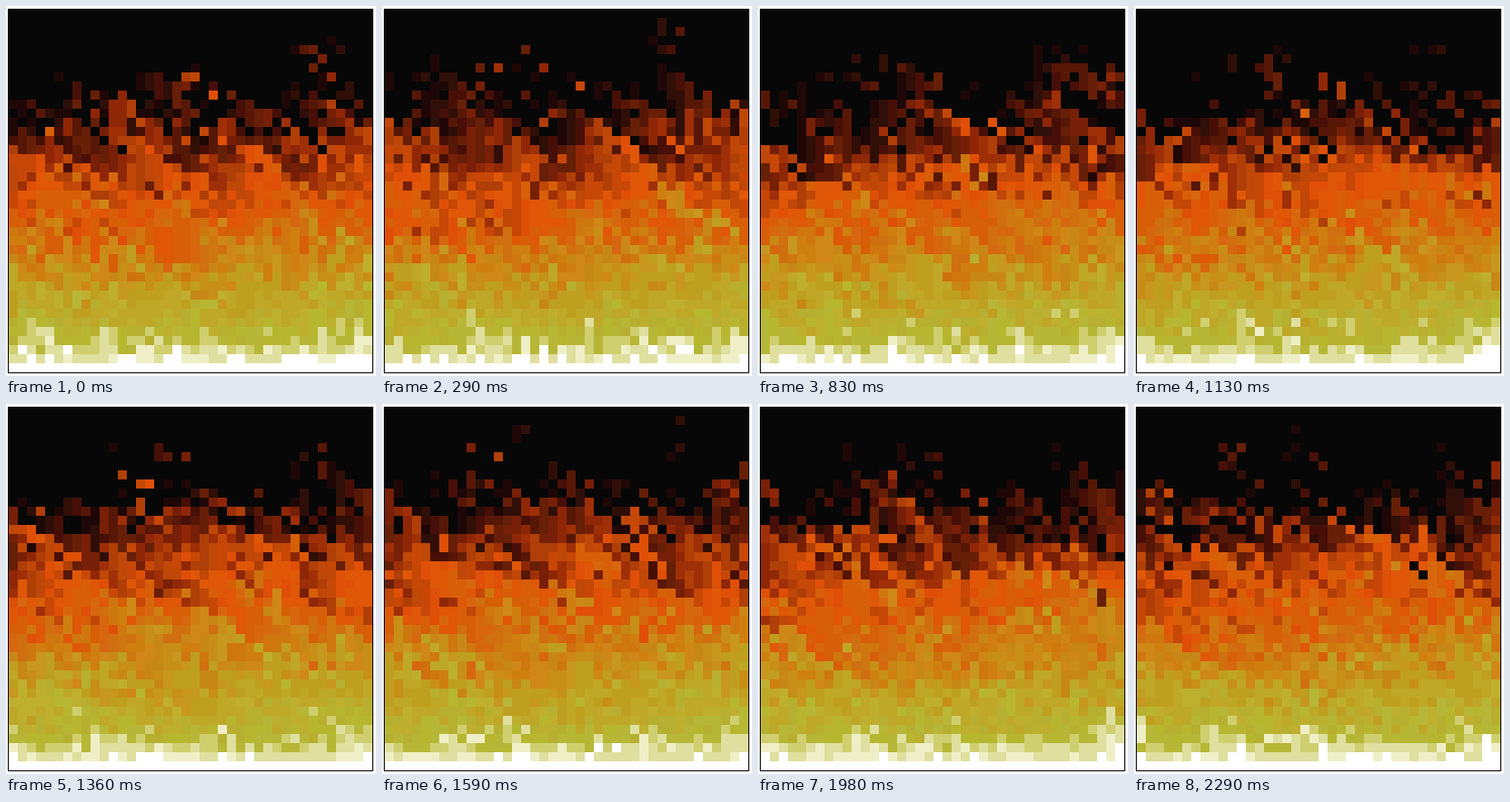
These frames come from a looping animation (407x407 px, 2.36 s). An HTML page with a canvas:

```html
<!DOCTYPE html>
<html lang="en">
<head>
<meta charset="utf-8">
<title>Pixel fire</title>
<style>
html, body { margin: 0; width: 100%; height: 100%; overflow: hidden; background: #fff; }
canvas { display: block; width: 407px; height: 407px; image-rendering: pixelated; }
</style>
</head>
<body>
<canvas id="stage" width="407" height="407"></canvas>
<script>
const SIZE = 40, CELL = 10, EDGE = 3, TICK = 50, LOOP = 2360;
const HOTTEST = 36;

// black, red, orange, yellow, white
const PALETTE = (
  '070707 1f0707 2f0f07 470f07 571707 671f07 771f07 8f2707 9f2f07 af3f07 ' +
  'bf4707 c74707 df4f07 df5707 df5707 d75f07 d75f07 d7670f cf6f0f cf770f ' +
  'cf7f0f cf8717 c78717 c78f17 c7971f bf9f1f bf9f1f bfa727 bfa727 bfaf2f ' +
  'b7af2f b7b72f b7b737 cfcf6f dfdf9f efefc7 ffffff'
).split(' ').map(hex => '#' + hex);

// length of each picture in units of 10 ms
const HOLDS = [...'7878787887878878788788788888788'].map(Number);

const starts = [];
HOLDS.reduce((time, hold) => {
  starts.push(time);
  return time + hold * 10;
}, 0);

// small fast counting generator: well mixed over long strides
function seeded(seed) {
  let a = 0, b = 0, c = seed, count = 1;
  const next = () => {
    const sum = (a + b + count++) | 0;
    a = b ^ (b >>> 9);
    b = (c + (c << 3)) | 0;
    c = (((c << 21) | (c >>> 11)) + sum) | 0;
    return (sum >>> 0) / 4294967296;
  };
  for (let i = 0; i < 20; i++) next();
  return next;
}

const random = seeded(1993);
const fire = new Uint8Array(SIZE * SIZE);
fire.fill(HOTTEST, SIZE * (SIZE - 1));

// heat rises one row, cools a little and drifts left
function spread() {
  for (let x = 0; x < SIZE; x++) {
    for (let y = 0; y < SIZE - 1; y++) {
      const i = y * SIZE + x;
      const decay = Math.floor(random() * 3);
      if (i >= decay) fire[i - decay] = Math.max(0, fire[i + SIZE] - decay);
    }
  }
}

for (let i = 0; i < 120; i++) spread();

let ticks = 0;
const pictures = starts.map(start => {
  for (; ticks < Math.floor(start / TICK); ticks++) spread();
  return fire.slice();
});

const ctx = document.getElementById('stage').getContext('2d');
let shown = -1;

function box(color, x, y, w, h) {
  ctx.fillStyle = color;
  ctx.fillRect(x, y, w, h);
}

function draw(index) {
  const side = SIZE * CELL;
  box('#fff', 0, 0, 407, 407);
  pictures[index].forEach((heat, i) => {
    box(PALETTE[heat], EDGE + (i % SIZE) * CELL, EDGE + Math.floor(i / SIZE) * CELL, CELL, CELL);
  });
  // frame: the top line lies over the first row of cells
  box('#000', EDGE - 1, EDGE, side + 2, 1);
  box('#000', EDGE - 1, EDGE + side, side + 2, 1);
  box('#000', EDGE - 1, EDGE, 1, side);
  box('#000', EDGE + side, EDGE, 1, side);
}

function update() {
  const time = (performance.now() - begin) % LOOP;
  let index = starts.length - 1;
  while (starts[index] > time) index--;
  if (index !== shown) draw(shown = index);
  requestAnimationFrame(update);
}

const begin = performance.now();
update();
</script>
</body>
</html>
```
